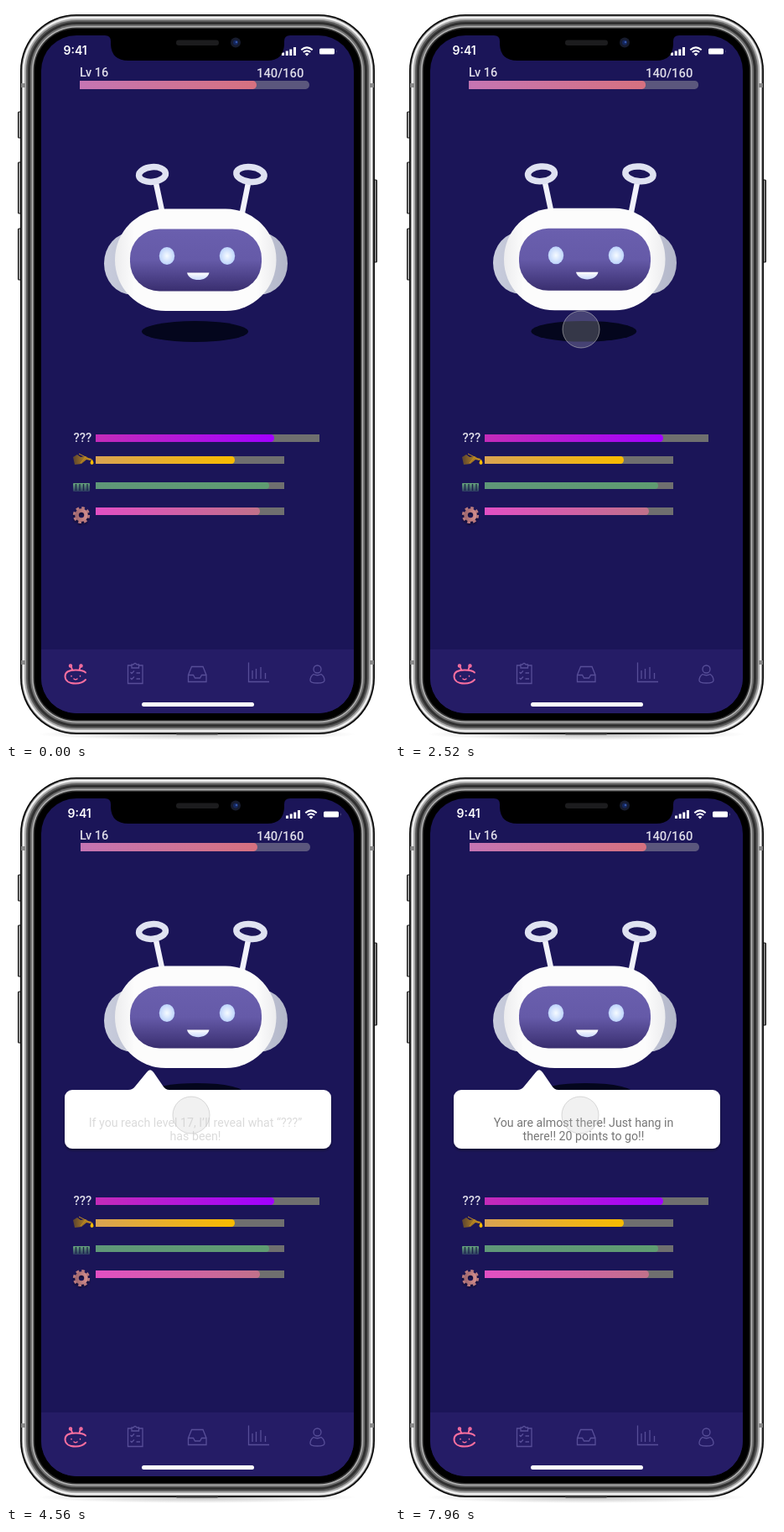
An HTML page for the animation above (8000 ms loop, 457 by 875 pixels).

```html
<!DOCTYPE html>
<html lang="en">
<head>
<meta charset="utf-8">
<title>Robot companion</title>
<style>
  html, body { margin: 0; width: 100%; height: 100%; overflow: hidden; background: #fff; }
  svg { display: block; width: 100%; height: 100%; }
  text { font-family: Roboto, Arial, sans-serif; }
  .label { font-weight: 500; fill: #dfdde9; }
  .speech { font-size: 14.2px; fill: #777; text-anchor: middle; }
</style>
</head>
<body>
<svg viewBox="0 0 457 875">
  <defs>
    <linearGradient id="exp"><stop stop-color="#c575b3"/><stop offset="1" stop-color="#d6717f"/></linearGradient>
    <linearGradient id="purple"><stop stop-color="#c42cb8"/><stop offset="1" stop-color="#a100ff"/></linearGradient>
    <linearGradient id="yellow"><stop stop-color="#d9a352"/><stop offset="1" stop-color="#f8bb00"/></linearGradient>
    <linearGradient id="green"><stop stop-color="#5f9778"/><stop offset="1" stop-color="#5f9c71"/></linearGradient>
    <linearGradient id="pink"><stop stop-color="#e24fc4"/><stop offset="1" stop-color="#c0718a"/></linearGradient>
    <linearGradient id="can"><stop stop-color="#5a4330"/><stop offset="1" stop-color="#d59a1c"/></linearGradient>
    <linearGradient id="cell" x2="0" y2="1"><stop stop-color="#67a57c"/><stop offset="1" stop-color="#2c3a63"/></linearGradient>
    <linearGradient id="gear"><stop stop-color="#a2696f"/><stop offset="1" stop-color="#d08b8b"/></linearGradient>
    <linearGradient id="face" x2="0" y2="1">
      <stop stop-color="#6a5fae"/><stop offset=".5" stop-color="#655aa8"/><stop offset="1" stop-color="#392e6f"/>
    </linearGradient>
    <linearGradient id="mouth" x2="0" y2="1"><stop stop-color="#fff"/><stop offset="1" stop-color="#c9d8fb"/></linearGradient>
    <linearGradient id="ear"><stop stop-color="#c9cddd"/><stop offset="1" stop-color="#b3b7c9"/></linearGradient>
    <linearGradient id="shell"><stop stop-color="#ececee"/><stop offset=".12" stop-color="#fcfcfc"/><stop offset=".88" stop-color="#fcfcfc"/><stop offset="1" stop-color="#ececee"/></linearGradient>
    <radialGradient id="eye"><stop stop-color="#f6fbff"/><stop offset="1" stop-color="#bdd3fb"/></radialGradient>
    <radialGradient id="floor"><stop stop-color="#bbb"/><stop offset="1" stop-color="#fff"/></radialGradient>
    <filter id="drop" x="-10%" y="-20%" width="120%" height="150%">
      <feDropShadow dx="0" dy="2" stdDeviation="1.5" flood-opacity=".45"/>
    </filter>
    <clipPath id="screen"><rect x="42" y="35" width="373" height="807" rx="42"/></clipPath>
  </defs>

  <rect width="457" height="875" fill="#fff"/>
  <ellipse cx="228" cy="867" rx="190" ry="7" fill="url(#floor)"/>
  <g id="body"></g>

  <g clip-path="url(#screen)">
    <rect x="42" y="35" width="373" height="807" fill="#1b1558"/>
    <rect x="42" y="766" width="373" height="76" fill="#251c66"/>

    <g id="status" fill="#fff">
      <text x="68.500" y="58" font-size="14" style="font-family:Inter,sans-serif;font-weight:600">9:41</text>
      <path d="M329 59v-3.500h3v3.500zM333.700 59v-5.500h3v5.500zM338.300 59v-7.500h3v7.500zM343 59v-10h3v10z"/>
      <g fill="none" stroke="#fff" stroke-width="2">
        <path d="M352.300 52.300q6.700-5.800 13.400 0M354.800 55q4.200-3.600 8.400 0"/>
      </g>
      <path d="M356.500 57q2.500-2 5 0l-2.500 2.500z"/>
      <rect x="374" y="50.500" width="18" height="7" rx="1.500"/>
      <path d="M394 52.500v3q1.300-1.500 0-3z" opacity=".4"/>
    </g>

    <path d="M118 35Q125 35 125 42V46Q126 65 146 65H312Q331 65 332 46V42Q332 35 339 35Z"/>
    <rect x="203" y="40.500" width="51" height="6.500" rx="3.200" fill="#1c1c1e"/>
    <circle cx="274" cy="43.500" r="6" fill="#171c2e"/>
    <circle cx="274" cy="43.500" r="3" fill="#14265c"/>
    <circle cx="275" cy="43" r="1.300" fill="#3556a8"/>

    <text class="label" x="88" y="84" font-size="14.500">Lv 16</text>
    <text class="label" x="299" y="84.500" font-size="14.800">140/160</text>
    <g id="exp-bar">
      <path d="M88 89H357.500a4.500 5 0 0 1 0 10H88z" fill="#5b577d"/>
      <path d="M88 89H294.500a4.500 5 0 0 1 0 10H88z" fill="url(#exp)"/>
    </g>

    <ellipse id="shadow" fill="#04061d"/>
    <g id="robot">
      <path d="M179 211L186.500 246M289 211L281.500 248" stroke="#f1f2fb" stroke-width="6.500"/>
      <g fill="none" stroke="#dfe2f1" stroke-width="7.500">
        <ellipse cx="174.500" cy="200.500" rx="16" ry="8.800" transform="rotate(-5 174.500 200.500)"/>
        <ellipse cx="291.500" cy="200.500" rx="16.700" ry="8.800" transform="rotate(6 291.500 200.500)"/>
      </g>
      <ellipse cx="150" cy="306.500" rx="33" ry="37" fill="url(#ear)"/>
      <ellipse cx="303" cy="306.500" rx="33" ry="37" fill="url(#ear)"/>
      <rect x="130" y="241.500" width="192.500" height="121.500" rx="60.500" fill="url(#shell)"/>
      <rect x="148" y="265.500" width="157" height="74" rx="35" fill="url(#face)"/>
      <ellipse cx="192" cy="297.500" rx="9.200" ry="10.500" fill="url(#eye)"/>
      <ellipse cx="264" cy="297.500" rx="9.200" ry="10.500" fill="url(#eye)"/>
      <path d="M216 317.500H242.500C240 329 218.500 329 216 317.500Z" fill="url(#mouth)"/>
    </g>

    <text class="label" x="80.500" y="519" font-size="14.800">???</text>
    <g id="stats"></g>
    <path d="M80 537l5-3 4 3 6-1 3 2 4 1-1 2-5-1-6 5-8 1z" fill="url(#can)"/>
    <path d="M87 533l8 4-6 7" fill="none" stroke="#c48e20" stroke-width="1"/>
    <path d="M102.500 539.500q4 5.500 0 6.500-4-1 0-6.500z" fill="#f8bb00"/>
    <rect x="80" y="568" width="20" height="10" rx="1" fill="url(#cell)"/>
    <path d="M83.500 569v8M88 569v8M92.500 569v8M97 569v8M100.500 571v4" stroke="#1b1f4a" stroke-width="1.300"/>
    <g filter="url(#drop)">
      <circle cx="90" cy="606" r="5.500" fill="none" stroke="url(#gear)" stroke-width="4.500"/>
      <circle cx="90" cy="606" r="8.700" fill="none" stroke="#b97a7d" stroke-width="2.800" stroke-dasharray="3.600 3.233"/>
    </g>

    <g fill="none" stroke="#fb6f9f" stroke-width="1.900" stroke-linecap="round">
      <path d="M95 793.500Q92 790.500 83 790.500C74 790.500 70.500 794 70.500 798C70.500 803 75 806.500 83 806.500Q91 806.500 95 802M78 787l1 3.500M88.500 787l-1 3.500"/>
      <circle cx="77" cy="785.500" r="1.300"/><circle cx="89.500" cy="785.500" r="1.300"/>
      <path d="M78 797.500v.5M88.500 797.500v.5M81 801q2 1.500 4 0" stroke-width="1.500"/>
    </g>
    <g fill="none" stroke="#574e98" stroke-width="1.300">
      <path d="M150 785H145.500V806.500H163V785H158.500M150 784h2q2-3 4 0h2.500v4H150zM148.500 793l1.500 1.500 3-3M148.500 800l1.500 1.500 3-3M155.500 794h4.500M155.500 801h4.500"/>
      <path d="M217.500 796.500l4-10H235l4 10v8H217.500zM217.500 796.500h6l2 3.500h6l2-3.500h5.500"/>
      <path d="M289.500 781.500V804.500H314M294 791v10M298.500 789v12M304 787v14M309.500 794v7"/>
      <circle cx="371.500" cy="789.500" r="4.500"/>
      <path d="M367 795.500Q363 798 363 803Q363 806 371.500 806Q380 806 380 803Q380 798 376 795.500Q371.500 798 367 795.500Z"/>
    </g>
    <rect x="162" y="829" width="134" height="5" rx="2.500" fill="#fff"/>

    <g id="bubble" filter="url(#drop)">
      <path d="M79 382H146Q151 382 154 378L168 361Q172 355.500 176 361L187 377Q190 382 195 382H379a9 9 0 0 1 9 9V443a9 9 0 0 1-9 9H79a9 9 0 0 1-9-9V391a9 9 0 0 1 9-9Z" fill="#fff"/>
    </g>
    <g id="hint" class="speech">
      <text x="226" y="425.500">If you reach level 17, I’ll reveal what “???”</text>
      <text x="226" y="442">has been!</text>
    </g>
    <g id="cheer" class="speech">
      <text x="225" y="425.500">You are almost there! Just hang in</text>
      <text x="225" y="442">there!! 20 points to go!!</text>
    </g>
  </g>
  <circle id="cursor" r="22" fill="#c8c8c8" fill-opacity=".25" stroke="#c0c0c0" stroke-opacity=".6"/>
</svg>

<script>
const $ = id => document.getElementById(id);
const LOOP = 8000, TAP = 3400;

// Phone casing: nested rounded frames around the screen
const rect = (x, y, w, h, rx, fill, extra = '') =>
  `<rect x="${x}" y="${y}" width="${w}" height="${h}" rx="${rx}" fill="${fill}" ${extra}/>`;
const edge = 'stroke="#111" stroke-width="1.2"';
const casing = [[0, '#050505'], [1.6, '#777'], [2.6, '#f0f0f0'], [5, '#aaa'], [7, '#5c5c5c'],
  [9, '#303030'], [12, '#707070'], [14, '#b5b5b5'], [15.5, '#333'], [17, '#000']];
$('body').innerHTML =
  [[126, 31], [186, 61], [265, 61]].map(([y, h]) => rect(14.6, y, 4, h, 1, '#aaa', edge)).join('') +
  rect(438, 207, 4.4, 98, 1, '#888', edge) +
  casing.map(([i, c]) => rect(17 + i, 10 + i, 423 - 2 * i, 857 - 2 * i, 67 - i, c)).join('') +
  [92, 779].map(y => rect(18, y, 5, 5, 0, '#8a8a8a') + rect(434, y, 5, 5, 0, '#8a8a8a')).join('') +
  rect(203, 865.5, 50, 2, 1, '#333');

const tube = (y, h, end, fill) => `<path d="M107 ${y}H${end - 4}a4 ${h / 2} 0 0 1 0 ${h}H107z" fill="${fill}"/>`;
$('stats').innerHTML = [
  [510, 9, 374, 320, 'purple'], [536, 9, 332, 273, 'yellow'],
  [567, 8, 332, 314, 'green'], [597, 9, 332, 303, 'pink']
].map(([y, h, full, end, id]) => rect(107, y, full - 107, h, 0, '#6f6f6f') + tube(y, h, end, `url(#${id})`)).join('');

const ramp = (t, a, b) => Math.min(1, Math.max(0, (t - a) / (b - a)));
const smooth = p => p * p * (3 - 2 * p);
const mix = (a, b, p) => a.map((v, i) => v + (b[i] - v) * p);

// Poses: robot dy, shadow cx cy rx ry, exp bar dx dy, status dx
const LOW = [0, 225.5, 387.5, 63.5, 12.5, 0, 0, 0];
const HIGH = [-7, 223.4, 385, 56, 11, 1, -1, 0];
const TALK = [-7, 227.5, 385, 55.5, 11, 1, -1, 5];
const bob = t => mix(LOW, HIGH, (1 - Math.cos(Math.PI * t / 1400)) / 2);
const pose = t => mix(bob(Math.min(t, TAP)), TALK, smooth(ramp(t, TAP, 3760)));

const move = (el, x, y) => el.setAttribute('transform', `translate(${x} ${y})`);

function slide(el, p, dist) {
  move(el, 0, dist * (1 - smooth(p)));
  el.setAttribute('opacity', p);
}

function drawCursor(t) {
  const left = 1 - ramp(t, 0, 2520), drop = smooth(ramp(t, 2860, 3320));
  const pressed = t >= 6720 && t < 7200;
  const c = $('cursor');
  c.setAttribute('cx', 222 + 189 * left ** 2.13 - drop);
  c.setAttribute('cy', 385 - 407 * left ** 1.57 + 27 * drop);
  c.setAttribute('r', pressed ? 22.5 : 22);
  c.setAttribute('visibility', t < 20 ? 'hidden' : 'visible');
}

function draw(t) {
  const [dy, cx, cy, rx, ry, barX, barY, statusX] = pose(t);
  move($('robot'), 0, dy);
  move($('exp-bar'), barX, barY);
  move($('status'), statusX, 0);
  Object.entries({ cx, cy, rx, ry }).forEach(([k, v]) => $('shadow').setAttribute(k, v));
  slide($('bubble'), ramp(t, 3360, 4240), 44);
  $('hint').setAttribute('opacity', t < 6720 ? smooth(ramp(t, 4380, 4920)) : t < 6800 ? 0.5 : 0);
  slide($('cheer'), ramp(t, 7040, 7960), 36);
  drawCursor(t);
}

const start = performance.now();
function tick() {
  draw((performance.now() - start) % LOOP);
  requestAnimationFrame(tick);
}
tick();
</script>
</body>
</html>
```
